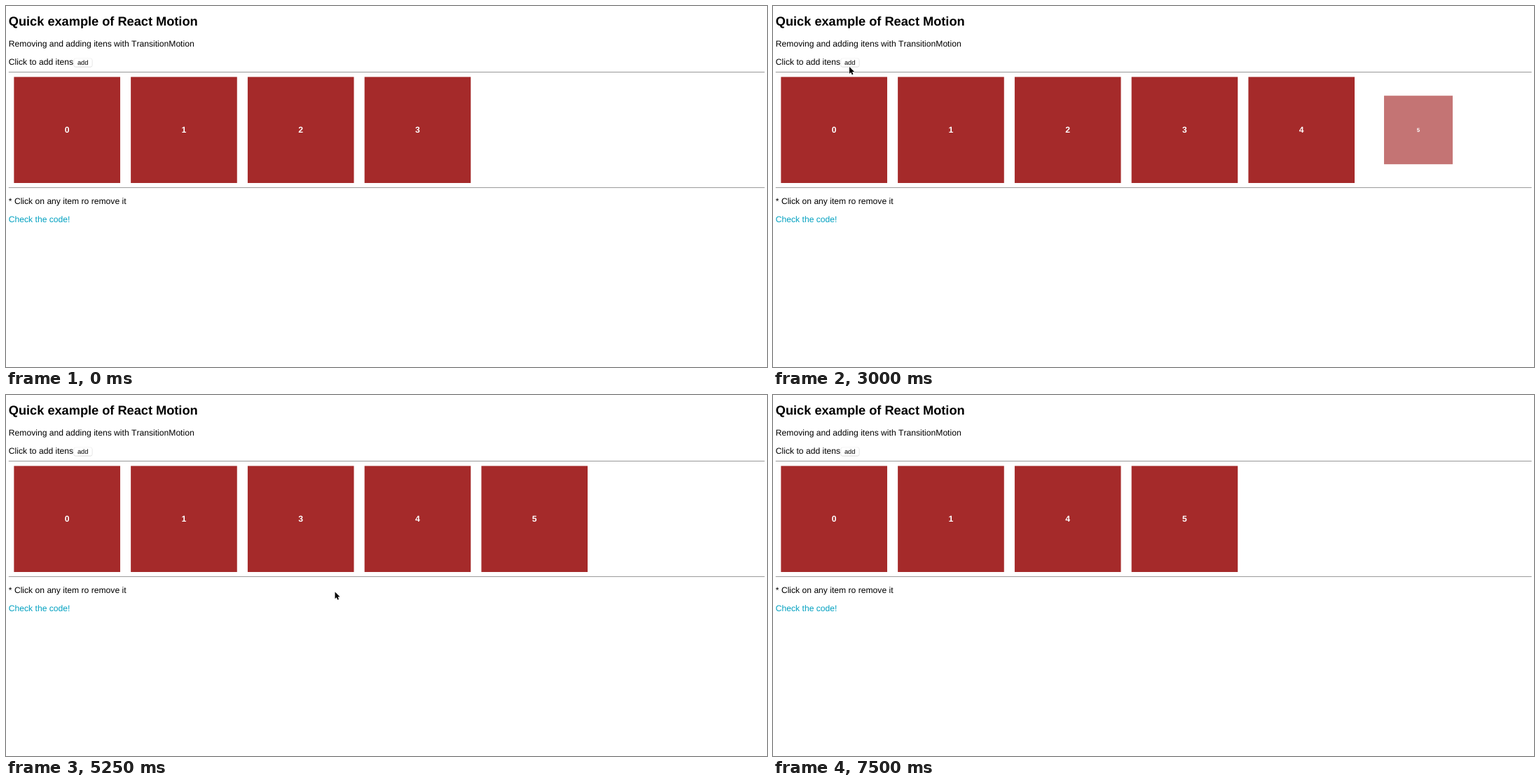
An HTML page for the animation above (7.75 s loop, 1086 by 516 pixels).

```html
<!DOCTYPE html>
<html lang="en">
<head>
<meta charset="utf-8">
<title>Quick example of React Motion</title>
<style>
  html, body { margin: 0; width: 100%; height: 100%; overflow: hidden; background: #fff; }
  svg { display: block; width: 1086px; height: 516px; }
  text {
    font: 12.13px "Liberation Sans", Arial, sans-serif;
    font-kerning: none;
    text-rendering: geometricPrecision;
  }
  .title { font-size: 18.2px; font-weight: bold; }
  .link { fill: #00a0c0; }
  .add { font-size: 9.3px; text-anchor: middle; }
  .item rect { fill: #a52a2a; }
  .item text { fill: #fff; font-weight: bold; text-anchor: middle; }
</style>
</head>
<body>
<svg viewBox="0 0 1086 516">
  <text class="title" x="3.8" y="28">Quick example of React Motion</text>
  <text x="3.8" y="58.3">Removing and adding itens with TransitionMotion</text>
  <text x="3.8" y="84.1">Click to add itens</text>
  <rect x="96.5" y="75" width="26.8" height="12.6" rx="3" fill="#d4d4d4"/>
  <rect x="96.9" y="74.8" width="26" height="12" rx="2.6" fill="#fff" stroke="#ececec" stroke-width=".6"/>
  <text class="add" x="109.7" y="84.2">add</text>
  <path d="M3.8 94.5H1082.6M3.8 259.6H1082.6" stroke="#989898"/>
  <text x="3.8" y="283.4">* Click on any item ro remove it</text>
  <text class="link" x="3.8" y="309.2">Check the code!</text>
  <g id="items"></g>
  <g id="cursor">
    <path d="M0 0V12.2L2.8 9.6L4.7 14L6.8 13.1L5 8.8H8.8Z" transform="scale(.8)"
      stroke="#fff" stroke-width="1.2" paint-order="stroke"/>
  </g>
</svg>
<script>
const LOOP = 7750, TICK = 250;

// The page is laid out in CSS pixels and shown at this zoom.
const ZOOM = .758;
const SIZE = 200 * ZOOM, PITCH = 220 * ZOOM, LEFT = 15 * ZOOM, TOP = 101.4;

// Spring of stiffness 170; an item leaves the row once it has settled.
const SPRING = Math.sqrt(170) / 1000, SETTLE = 740;

// Clicks that add or remove an item.
const items = [
  {}, {}, { removed: 4350 }, { removed: 6160 },
  { added: 1923 }, { added: 2831 }
];

// Pointer moves; it rests between them.
const enter = { at: 250, x: 430, y: 133 }, hideAt = 7500;
const moves = [
  { at: 250, ms: 750, x: 106, y: 83.5 },
  { at: 2750, ms: 250, x: 109, y: 87 },
  { at: 3000, ms: 750, x: 416, y: 214 },
  { at: 4250, ms: 500, x: 744, y: 313 },
  { at: 5000, ms: 250, x: 469.5, y: 281.5 },
  { at: 5250, ms: 750, x: 412, y: 214 },
  { at: 6000, ms: 750, x: 781.5, y: 73 },
  { at: 6750, ms: 250, x: 871, y: 41 }
];

function make(tag, attrs, parent) {
  const node = document.createElementNS("http://www.w3.org/2000/svg", tag);
  for (const key in attrs) node.setAttribute(key, attrs[key]);
  return parent.appendChild(node);
}

const layer = document.getElementById("items");
const cursor = document.getElementById("cursor");

items.forEach((item, i) => {
  item.node = make("g", { class: "item" }, layer);
  make("rect", { x: -SIZE / 2, y: -SIZE / 2, width: SIZE, height: SIZE }, item.node);
  make("text", { y: 4.2 }, item.node).textContent = i;
});

// Critically damped spring from 0 to 1.
function spring(ms) {
  const p = Math.max(0, ms) * SPRING;
  return 1 - (1 + p) * Math.exp(-p);
}

function ease(k) {
  k = Math.min(1, Math.max(0, k));
  return k * k * (3 - 2 * k);
}

function drawItems(t) {
  let slot = 0;
  for (const { added = -LOOP, removed = Infinity, node } of items) {
    const present = t >= added && t < removed + SETTLE;
    const scale = t < removed ? spring(t - added) : 1 - spring(t - removed);
    node.style.display = present && scale > .04 ? "" : "none";
    if (!present) continue;
    const x = LEFT + PITCH * slot++ + SIZE / 2;
    node.setAttribute("transform", `translate(${x} ${TOP + SIZE / 2}) scale(${scale})`);
    node.setAttribute("opacity", scale);
  }
}

function drawCursor(t) {
  let { x, y } = enter;
  for (const move of moves) {
    const k = ease((t - move.at) / move.ms);
    x += (move.x - x) * k;
    y += (move.y - y) * k;
  }
  cursor.style.display = t >= enter.at && t < hideAt ? "" : "none";
  cursor.setAttribute("transform", `translate(${x} ${y})`);
}

const start = performance.now();

// The picture advances four times a second.
function frame() {
  const elapsed = (performance.now() - start) % LOOP;
  const t = Math.floor(elapsed / TICK) * TICK;
  drawItems(t);
  drawCursor(t);
  requestAnimationFrame(frame);
}
frame();
</script>
</body>
</html>
```
